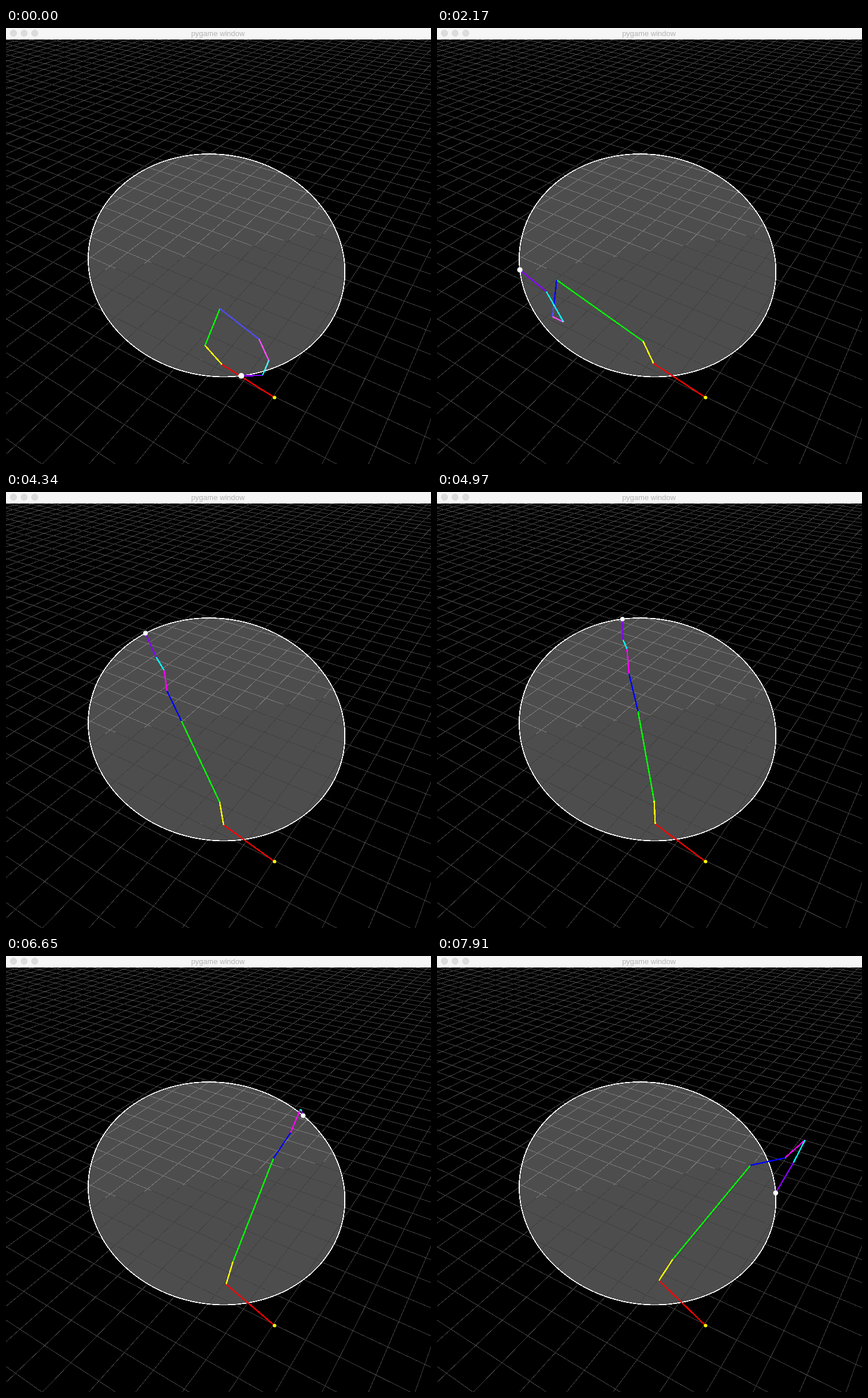
An HTML page for the animation above (8000 ms loop, 739 by 758 pixels).

```html
<!DOCTYPE html>
<html lang="en">
<head>
<meta charset="utf-8">
<title>pygame window</title>
<style>
  html, body { margin: 0; width: 100%; height: 100%; overflow: hidden; background: #000; }
  svg { display: block; width: 739px; height: 758px; }
  path { fill: none; shape-rendering: crispEdges; }
  text { font: 13px "Liberation Sans", Arial, sans-serif; fill: #b2b2b2; text-anchor: middle; }
</style>
</head>
<body>
<svg viewBox="0 0 739 758">
  <defs>
    <clipPath id="near"><path id="nearHalf"/></clipPath>
    <clipPath id="inside"><path id="clipDisc"/></clipPath>
  </defs>
  <rect width="739" height="758"/>
  <path id="grid" stroke="#404040"/>
  <path id="disc" style="fill:#fff;fill-opacity:.3"/>
  <g clip-path="url(#near)"><use href="#grid"/></g>
  <path id="rim" stroke="#fff" stroke-width="1.7"/>
  <g id="arm" stroke-width="2.4"></g>
  <g clip-path="url(#inside)">
    <path id="veil" stroke="#fff" stroke-opacity=".3" stroke-width="2.4"/>
  </g>
  <circle cx="467" cy="642.5" r="3" fill="#ff0"/>
  <circle id="ball" fill="#fff"/>
  <rect width="739" height="20" fill="#f6f6f6"/>
  <g fill="#dcdcdc" stroke="#d0d0d0" stroke-width=".7">
    <circle cx="13" cy="9" r="5.5"/><circle cx="31.5" cy="9" r="5.5"/><circle cx="50" cy="9" r="5.5"/>
  </g>
  <text x="368.5" y="14">pygame window</text>
</svg>
<script>
const $ = id => document.getElementById(id);
const rad = Math.PI / 180;

// Camera with a 45 degree lens, aimed at the middle of the disc.
const FOCAL = 369.5 / Math.tan(22.5 * rad), DISTANCE = 20.2, ELEVATION = 37 * rad;
const CENTER = [371, 388], GRID_TURN = -32.3 * rad;
const RADIUS = 5.035, DISC_TURN = 15.3 * rad, TILT = 22.5 * rad;

// right / forward / up, in grid cells
function project(x, y, z = 0) {
  const sin = Math.sin(ELEVATION), cos = Math.cos(ELEVATION);
  const depth = 1 + (y * cos - z * sin) / DISTANCE;
  const scale = FOCAL / DISTANCE / depth;
  return [CENTER[0] + x * scale, CENTER[1] - (y * sin + z * cos) * scale, depth];
}

function turned(a, b, turn, z) {
  const c = Math.cos(turn), s = Math.sin(turn);
  return project(a * c - b * s, a * s + b * c, z);
}

const ground = (a, b) => turned(a, b, GRID_TURN);

function onDisc(degrees) {
  const u = RADIUS * Math.cos(degrees * rad), v = RADIUS * Math.sin(degrees * rad);
  return turned(u, v * Math.cos(TILT), DISC_TURN, v * Math.sin(TILT));
}

const xy = p => p[0].toFixed(2) + ' ' + p[1].toFixed(2);
const line = (...points) => 'M' + points.map(xy).join('L');
const arc = (from, to) =>
  line(...Array.from({ length: (to - from) / 2 + 1 }, (_, i) => onDisc(from + i * 2))) + 'Z';

let lines = '';
for (let b = -12; b <= 38; b++) lines += line(ground(-35, b), ground(12, b));
for (let a = -35; a <= 12; a++) lines += line(ground(a, -12), ground(a, 38));
$('grid').setAttribute('d', lines);
$('nearHalf').setAttribute('d', arc(180, 360));
for (const id of ['disc', 'rim', 'clipDisc']) $(id).setAttribute('d', arc(0, 358));

// Smooth curve through unevenly spaced keys.
function spline(times, values) {
  const last = times.length - 1;
  const gap = k => times[k + 1] - times[k];
  const slope = k => (values[k + 1] - values[k]) / gap(k);
  const tangents = times.map((_, k) => k > 0 && k < last
    ? (slope(k - 1) * gap(k) + slope(k) * gap(k - 1)) / (gap(k - 1) + gap(k)) : 0);
  tangents[0] = 2 * slope(0) - tangents[1];
  tangents[last] = 2 * slope(last - 1) - tangents[last - 1];
  return t => {
    let k = 0;
    while (k < last - 1 && t > times[k + 1]) k++;
    const h = gap(k), u = (t - times[k]) / h, w = 1 - u;
    return w * w * (1 + 2 * u) * values[k] + u * u * (3 - 2 * u) * values[k + 1]
      + h * u * w * (w * tangents[k] - u * tangents[k + 1]);
  };
}

const KEYS = [0, 15, 31, 54, 85, 102];
const track = (xs, ys) => {
  const x = spline(KEYS, xs), y = spline(KEYS, ys);
  return t => [x(t), y(t)];
};

// The ball circles evenly; the two lowest joints only drift, the others bend.
const ballAt = step => onDisc(264.5 - step * 360 / 130);
const joints = [
  () => [467, 642.5],
  t => [375.5 + t * t / 1000, 585 - t * t / 500],
  t => [346 + 0.3 * t + 0.0032 * t * t, 552 - 0.24 * t],
  track([372, 226, 208, 305, 465, 545], [488, 572, 438, 398, 352, 364]),
  track([440, 270, 201, 280, 495, 605], [541, 663, 502, 346, 307, 351]),
  track([457, 295, 220, 275, 512, 640], [578, 677, 511, 310, 266, 320]),
  track([446, 281, 190, 261, 514, 620], [604, 632, 458, 287, 270, 359]),
  ballAt
];

const links = ['#f00', '#ff0', '#0f0', '#00f', '#f0f', '#0ff', '#80f'].map(color => {
  const path = document.createElementNS('http://www.w3.org/2000/svg', 'path');
  path.setAttribute('stroke', color);
  return $('arm').appendChild(path);
});

// The arm advances once per tick, stutters for a while, then runs slightly slow.
const TICK = 70, LOOP = 8000, LAST_STEP = 102, STUTTER = { from: 31, to: 51, rate: 0.6 };
function stepAt(ms) {
  const tick = Math.floor(ms / TICK);
  const { from, to, rate } = STUTTER;
  const stuttered = Math.floor((Math.min(tick, to) - Math.min(tick, from)) * rate + 1e-6);
  const late = Math.ceil(Math.max(0, tick - to) * 0.951);
  return Math.min(LAST_STEP, Math.min(tick, from) + stuttered + late);
}

// Part of the arm that starts out behind the translucent disc and rises through it.
function veilPath(step, [, , , elbow, fore, wrist, hand]) {
  const risen = step / 46;
  if (risen > 1) return '';
  const start = [0, 1].map(k => elbow[k] + (fore[k] - elbow[k]) * risen);
  return line(start, fore, wrist, ...(risen < 0.2 ? [hand] : []));
}

function render(ms) {
  const step = stepAt(ms);
  const points = joints.map(joint => joint(step));
  const ball = points[points.length - 1];
  links.forEach((link, k) => link.setAttribute('d', line(points[k], points[k + 1])));
  $('veil').setAttribute('d', veilPath(step, points));
  $('ball').setAttribute('cx', ball[0]);
  $('ball').setAttribute('cy', ball[1]);
  $('ball').setAttribute('r', 4.4 / ball[2]);
}

const began = performance.now();
function frame() {
  render((performance.now() - began) % LOOP);
  requestAnimationFrame(frame);
}
frame();
</script>
</body>
</html>
```
